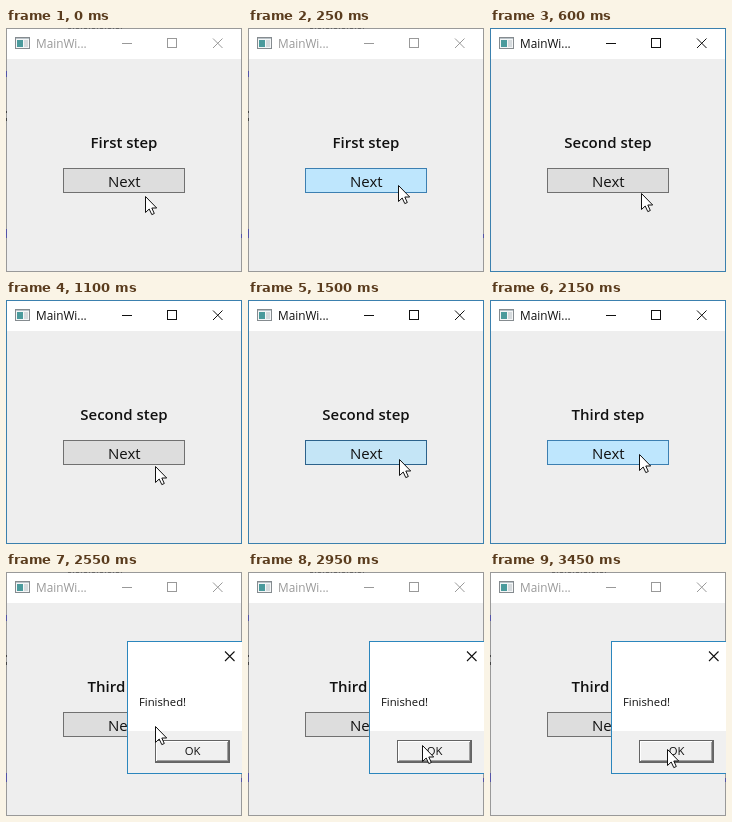
An HTML page for the animation above (3500 ms loop, 236 by 244 pixels).

```html
<!DOCTYPE html>
<html lang="en">
<head>
<meta charset="utf-8">
<title>Step dialog</title>
<style>
  html, body { margin: 0; width: 100%; height: 100%; overflow: hidden; background: #eee; }
  svg { display: block; width: 236px; height: 244px; }
  text { font-family: "Open Sans", "Noto Sans", sans-serif; }
  .crisp { shape-rendering: crispEdges; }
</style>
</head>
<body>
<svg viewBox="0 0 236 244">
  <rect width="236" height="244" fill="#eee"/>
  <rect width="236" height="31" fill="#fff"/>

  <g class="crisp">
    <rect x="9" y="9" width="15" height="12" fill="#858b8f"/>
    <rect x="10" y="10" width="13" height="10" fill="#f4f6f7"/>
    <rect x="10" y="10" width="13" height="1" fill="#b9c2c8"/>
    <rect x="11" y="12" width="6" height="7" fill="#4a9a9c"/>
    <rect x="18" y="12" width="4" height="7" fill="#d5dadd"/>
  </g>
  <text id="title" x="30" y="20" font-size="11.8">MainWi...</text>
  <g id="controls" fill="none">
    <path d="M116 15.5h10M161.5 10.5h9v9h-9z" class="crisp"/>
    <path d="M207 10.5l9.5 9.5M216.5 10.5l-9.5 9.5"/>
  </g>

  <text id="label" x="118" y="120" font-size="15" font-weight="600" text-anchor="middle" fill="#111"></text>
  <rect id="button" class="crisp" x="57.5" y="140.5" width="121" height="24"/>
  <text x="118.3" y="159" font-size="15" text-anchor="middle" fill="#111">Next</text>

  <rect id="border" class="crisp" x=".5" y=".5" width="235" height="243" fill="none"/>
  <g id="behind" class="crisp">
    <path d="M62 .5h54" stroke="#666" stroke-dasharray="3 2 1 2"/>
    <path d="M.5 43v6M.5 201v9M235.5 206v4" stroke="#5454a8"/>
    <path d="M.5 83v2M.5 90v3" stroke="#444"/>
  </g>

  <g id="dialog">
    <rect x="121" y="69" width="115" height="133" fill="#fff"/>
    <rect x="121" y="159" width="115" height="43" fill="#f0f0f0"/>
    <path class="crisp" d="M236 69.5H121.5V201.5H236" fill="none" stroke="#2b86bd"/>
    <path d="M219 79.5l9.5 9.5M228.5 79.5l-9.5 9.5" stroke="#111" stroke-width="1.1"/>
    <text x="133" y="134" font-size="11.3" fill="#111">Finished!</text>
    <g class="crisp" fill="none">
      <rect x="149.5" y="168.5" width="74" height="22" fill="#f0f0f0" stroke="#646464"/>
      <path d="M150.5 189V169.5H222" stroke="#fff"/>
      <path d="M150 189.5H222.5V169" stroke="#696969"/>
      <path d="M151 188.5H221.5V170" stroke="#a0a0a0"/>
    </g>
    <text x="186.6" y="183" font-size="11.3" text-anchor="middle" fill="#111">OK</text>
  </g>

  <path id="cursor" d="M.5 .5V16.5L4.2 13L6.8 18.6L9.3 17.5L6.8 12H11.7Z" fill="#fff" stroke="#111" stroke-linejoin="round"/>
</svg>
<script>
const LOOP = 3500, TICK = 50;
const el = id => document.getElementById(id);
const [title, controls, label, button, border, behind, dialog, cursor] =
  ['title', 'controls', 'label', 'button', 'border', 'behind', 'dialog', 'cursor'].map(el);

// time, x, y of the pointer tip
const path = [
  [0, 139, 168], [250, 150, 157], [500, 150, 157], [600, 151, 165], [650, 151, 165],
  [800, 146, 174], [900, 146, 174], [1100, 149, 166], [1300, 151, 159], [1600, 151, 159],
  [1900, 150, 176], [1950, 150, 176], [2150, 149, 154], [2550, 149, 154],
  [3000, 177, 175], [3050, 177, 175], [3300, 177, 177], [3500, 177, 177]
];
const presses = [[400, 500], [1450, 1600], [2250, 2350]];
const looks = {
  normal: ['#ddd', '#707070'],
  hover: ['#bee6fd', '#3c7fb1'],
  pressed: ['#c4e5f6', '#2c628b']
};

function pointerAt(t) {
  const i = path.findIndex(p => p[0] > t);
  const a = path[i - 1], b = path[i];
  const k = (t - a[0]) / (b[0] - a[0]);
  return [1, 2].map(n => Math.round(a[n] + (b[n] - a[n]) * k));
}

function draw(time) {
  const t = Math.floor((time % LOOP) / TICK) * TICK;
  const [x, y] = pointerAt(t);
  const open = t >= 2350;
  const active = t >= 400 && !open;
  const over = !open && y >= 140 && y < 165;
  const down = presses.some(([from, to]) => t >= from && t < to);
  const [fill, stroke] = looks[down ? 'pressed' : over ? 'hover' : 'normal'];
  const ink = active ? '#111' : '#999';

  label.textContent = (t < 500 ? 'First' : t < 1600 ? 'Second' : 'Third') + ' step';
  button.setAttribute('fill', fill);
  button.setAttribute('stroke', stroke);
  title.setAttribute('fill', ink);
  controls.setAttribute('stroke', ink);
  border.setAttribute('stroke', active ? '#3b80ae' : '#999');
  behind.style.display = active ? 'none' : '';
  dialog.style.display = open ? '' : 'none';
  cursor.setAttribute('transform', `translate(${x} ${y})`);
}

const start = performance.now();
function frame() {
  draw(performance.now() - start);
  requestAnimationFrame(frame);
}
frame();
</script>
</body>
</html>
```
